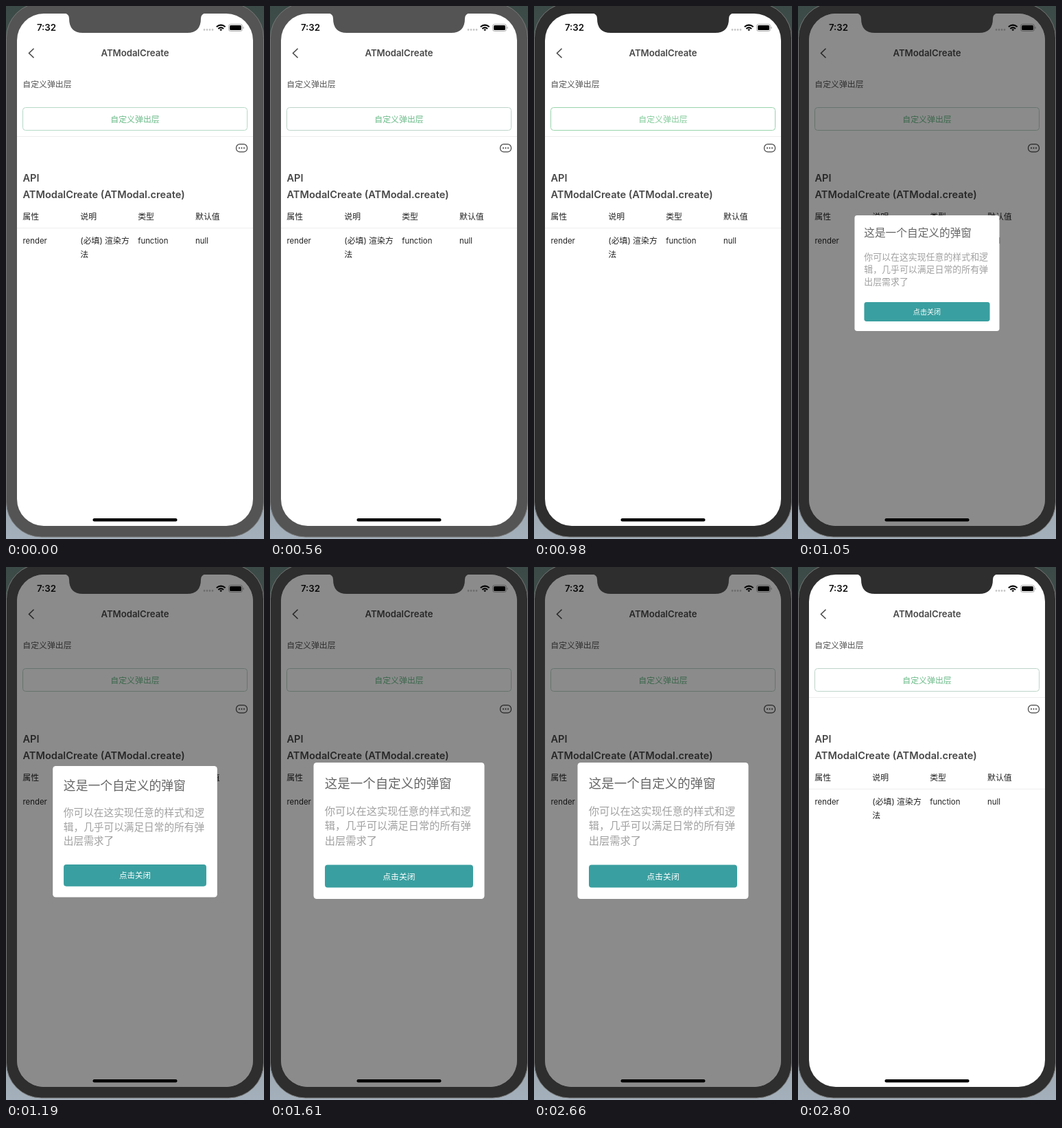
Animation, 376 px wide and 774 px high, one loop 3850 ms. Source, as an HTML page:

```html
<!DOCTYPE html>
<html lang="zh-CN">
<head>
<meta charset="utf-8">
<title>ATModalCreate</title>
<style>
  html, body { margin: 0; width: 100%; height: 100%; overflow: hidden; background: #6a7070; }
  svg { display: block; width: 376px; height: 774px; }
  text { font: 11.9px Inter, "Noto Sans CJK SC", "Noto Sans CJK", sans-serif; fill: #222; }
  .mid { text-anchor: middle; }
  .latin { font-size: 11.4px; }
  .bold { font-weight: 600; fill: #484848; }
  .head { font-size: 14.6px; }
  .line { stroke: #eee; }
  .body text { font-size: 15.25px; fill: #a0a0a0; }
</style>
</head>
<body>
<svg viewBox="0 0 376 774">
  <defs>
    <linearGradient id="photo" x2="0" y2="1">
      <stop offset="0" stop-color="#3b4a46"/>
      <stop offset=".5" stop-color="#6a7070"/>
      <stop offset="1" stop-color="#a4b0bb"/>
    </linearGradient>
  </defs>
  <rect width="376" height="774" fill="url(#photo)"/>
  <rect class="bezel" x=".5" y="-4.5" width="375" height="775.5" rx="51" stroke="#777"/>
  <rect x="16" y="11" width="344" height="744" rx="39" fill="#fff"/>

  <!-- status bar -->
  <text class="mid" x="59" y="36.3" style="font-size:13.3px;font-weight:600;fill:#111">7:32</text>
  <path d="M289 34.5h.01M293 34.5h.01M297 34.5h.01M301 34.5h.01" stroke="#c8c8c8" stroke-width="2.8" stroke-linecap="round"/>
  <g fill="none" stroke="#000" stroke-width="2">
    <path d="M306.8 30.3Q313.2 25 319.6 30.3M309.3 33Q313.2 29.8 317.1 33"/>
    <path d="M311.3 34.2Q313.2 33 315.1 34.2L313.2 36.2Z" fill="#000" stroke="none"/>
  </g>
  <rect x="324.5" y="26.5" width="20" height="10" rx="2.8" fill="none" stroke="#aaa"/>
  <rect x="326" y="28" width="17" height="7" rx="1.5"/>
  <path d="M346 30v3" stroke="#aaa"/>

  <!-- page -->
  <path d="M40.5 61.8L33.5 68.5L40.5 75.2" fill="none" stroke="#444" stroke-width="1.5"/>
  <text class="mid bold" x="188" y="73" style="font-size:13.2px">ATModalCreate</text>
  <text x="24.3" y="118" style="fill:#555">自定义弹出层</text>
  <rect id="edge" x="24.5" y="147.5" width="327" height="33" rx="4" fill="none"/>
  <text id="label" class="mid" x="188" y="168.7">自定义弹出层</text>
  <g id="lines"><path class="line" d="M16 189.5H360M16 322.5H360"/></g>
  <rect x="335.5" y="200.7" width="16" height="11.2" rx="5.2" fill="none" stroke="#444" stroke-width="1.2"/>
  <path d="M340 206.3h.01M343.5 206.3h.01M347 206.3h.01" stroke="#333" stroke-width="1.9" stroke-linecap="round"/>

  <text class="bold head" x="24.5" y="255.3">API</text>
  <text class="bold head" x="24.5" y="279.3">ATModalCreate (ATModal.create)</text>
  <text x="24.3" y="309.5">属性</text>
  <text x="108.3" y="309.5">说明</text>
  <text x="192.2" y="309.5">类型</text>
  <text x="276" y="309.5">默认值</text>
  <text class="latin" x="24.5" y="344.7">render</text>
  <text x="108.3" y="345">(必填) 渲染方</text>
  <text x="108.3" y="364.5">法</text>
  <text class="latin" x="192.2" y="344.7">function</text>
  <text class="latin" x="276" y="344.7">null</text>

  <g id="overlay">
    <rect x="16" y="11" width="344" height="744" rx="39" fill="#000" opacity=".455"/>
    <g id="modal">
      <rect x="63.5" y="284" width="249" height="198" rx="4.5" fill="#fff"/>
      <text x="79.8" y="320.5" style="font-size:18.5px;fill:#666">这是一个自定义的弹窗</text>
      <g class="body">
        <text x="79.8" y="360">你可以在这实现任意的样式和逻</text>
        <text x="79.8" y="381.3">辑，几乎可以满足日常的所有弹</text>
        <text x="79.8" y="402.6">出层需求了</text>
      </g>
      <rect x="80" y="432.5" width="216" height="33" rx="4" fill="#3a9fa0"/>
      <text class="mid" x="188" y="453.6" style="fill:#fff">点击关闭</text>
    </g>
  </g>
  <path class="bezel" d="M85 10.5Q92 11.5 92 18Q92 39 112 39H264Q284 39 284 18Q284 11.5 291 10.5Z"/>
  <rect x="126.5" y="744" width="123" height="4.4" rx="2.2"/>
</svg>
<script>
const LOOP = 3850, DARK = 910, PRESS = 980, OPEN = 1050, CLOSE = 2800;
const $ = id => document.getElementById(id);
const bezels = document.querySelectorAll('.bezel');
const show = (el, on) => el.style.display = on ? '' : 'none';

function draw(now) {
  const t = now % LOOP;
  const open = t >= OPEN && t < CLOSE;
  const pressed = t >= PRESS && t < OPEN;

  bezels.forEach(b => b.style.fill = t < DARK ? '#545454' : '#2e2e2e');
  $('label').style.fill = pressed ? '#84cc9b' : '#6cbc8a';
  $('edge').style.stroke = pressed ? '#98d3ab' : t < 70 ? '#b5d9c6' : '#bdd5c9';
  show($('lines'), !open);
  show($('overlay'), open);

  // near-critical spring: the card grows and rises into place
  const x = Math.max(0, t - PRESS) * .015;
  const rest = .214 * (1 + x) * Math.exp(-x);
  $('modal').setAttribute('transform',
    `translate(188 ${383 + 33 * rest}) scale(${1 - rest}) translate(-188 -383)`);
}

const start = performance.now();
function tick() {
  draw(performance.now() - start);
  requestAnimationFrame(tick);
}
tick();
</script>
</body>
</html>
```
